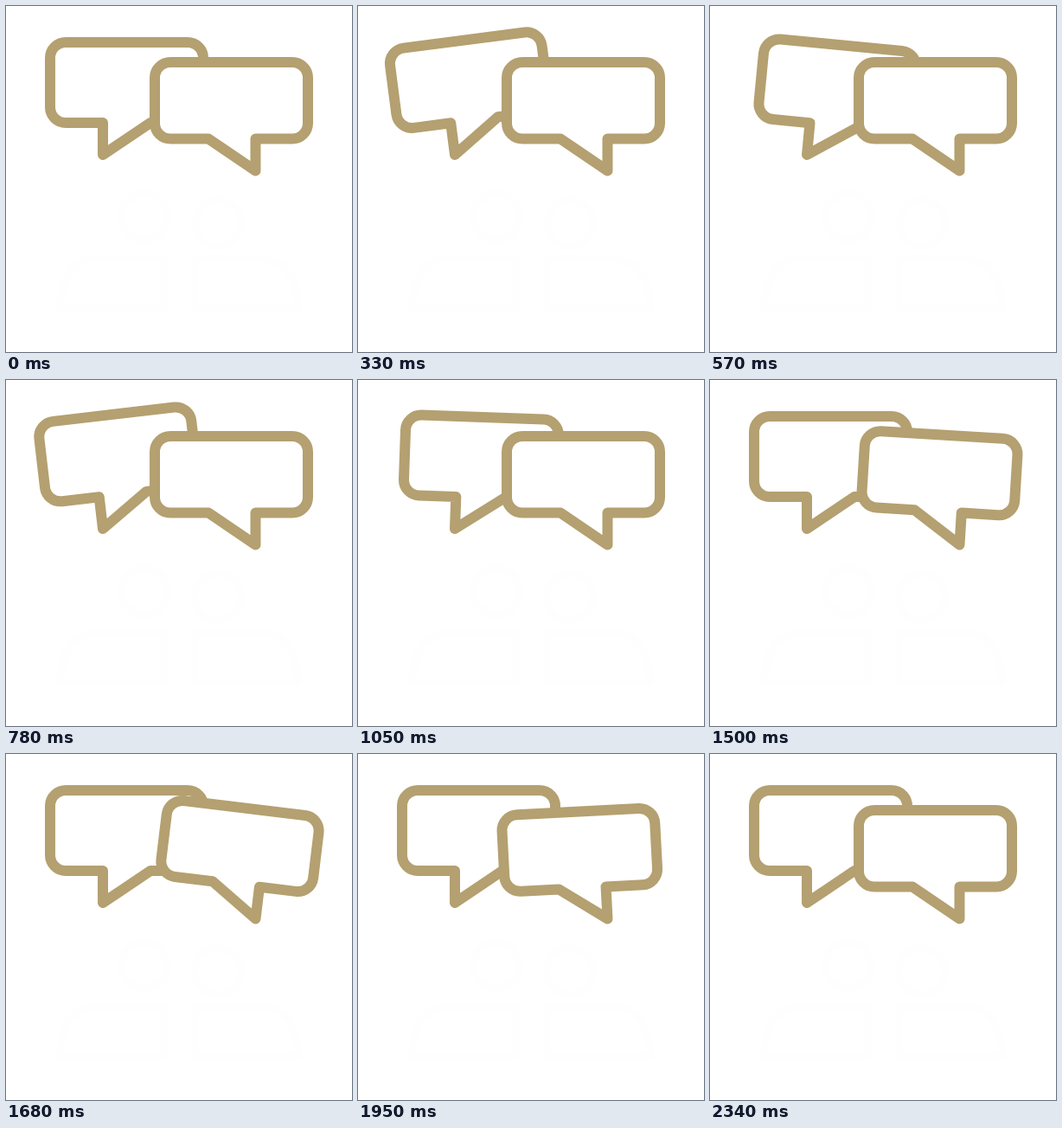
An HTML page that plays this animation: 400x400 px, repeating every 2550 ms.

```html
<!DOCTYPE html>
<html lang="en">
<head>
<meta charset="utf-8">
<title>Speech bubbles</title>
<style>
  html, body { margin: 0; width: 100%; height: 100%; overflow: hidden; background: #fff; }
  svg { display: block; width: 100%; height: 100%; }
  .bubble { fill: #fff; stroke: #b4a070; stroke-width: 12; stroke-linejoin: round; }
  .people { fill: none; stroke: #fefefe; stroke-width: 8; stroke-linejoin: round; }
</style>
</head>
<body>
<svg viewBox="0 0 400 400">
  <g class="people">
    <circle cx="160" cy="244" r="27"/>
    <circle cx="245" cy="251" r="27"/>
    <path d="M62 350Q66 292 105 292H182V350Z"/>
    <path d="M338 350Q334 292 295 292H218V350Z"/>
  </g>
  <path class="bubble" id="left"/>
  <path class="bubble" id="right"/>
</svg>
<script>
const LOOP = 2550, STEP = 30;
const ANGLES = [0, -20, 14, -9, 3, 0];
const LEGS = [230, 240, 240, 240, 260];

const bubbles = [
  { el: document.getElementById('left'), start: 0, tip: [112, 172],
    box: [51, 42, 228, 135], tail: [112, 167] },
  { el: document.getElementById('right'), start: 1120, tip: [288.5, 190.5],
    box: [172, 65, 349, 153.5], tail: [234, 288.5] }
];

// Rounded box with a pointed tail hanging from its lower edge
function outline({ box: [x0, y0, x1, y1], tail: [a, b], tip }) {
  const r = 18, arc = (x, y) => `A${r} ${r} 0 0 1 ${x} ${y}`;
  return `M${x0 + r} ${y0}H${x1 - r}${arc(x1, y0 + r)}V${y1 - r}${arc(x1 - r, y1)}` +
    `H${b}L${tip}L${a} ${y1}H${x0 + r}${arc(x0, y1 - r)}V${y0 + r}${arc(x0 + r, y0)}Z`;
}

// Decaying swing, eased in and out between turning points
function swing(t) {
  if (t <= 0) return 0;
  for (let i = 0; i < LEGS.length; i++) {
    if (t < LEGS[i]) {
      const k = (1 - Math.cos(Math.PI * t / LEGS[i])) / 2;
      return ANGLES[i] + (ANGLES[i + 1] - ANGLES[i]) * k;
    }
    t -= LEGS[i];
  }
  return 0;
}

function draw(ms) {
  const t = Math.floor((ms % LOOP) / STEP) * STEP;
  for (const { el, start, tip } of bubbles) {
    el.setAttribute('transform', `rotate(${swing(t - start).toFixed(3)} ${tip})`);
  }
}

for (const b of bubbles) b.el.setAttribute('d', outline(b));

const origin = performance.now();
function tick() {
  draw(performance.now() - origin);
  requestAnimationFrame(tick);
}
tick();
</script>
</body>
</html>
```
